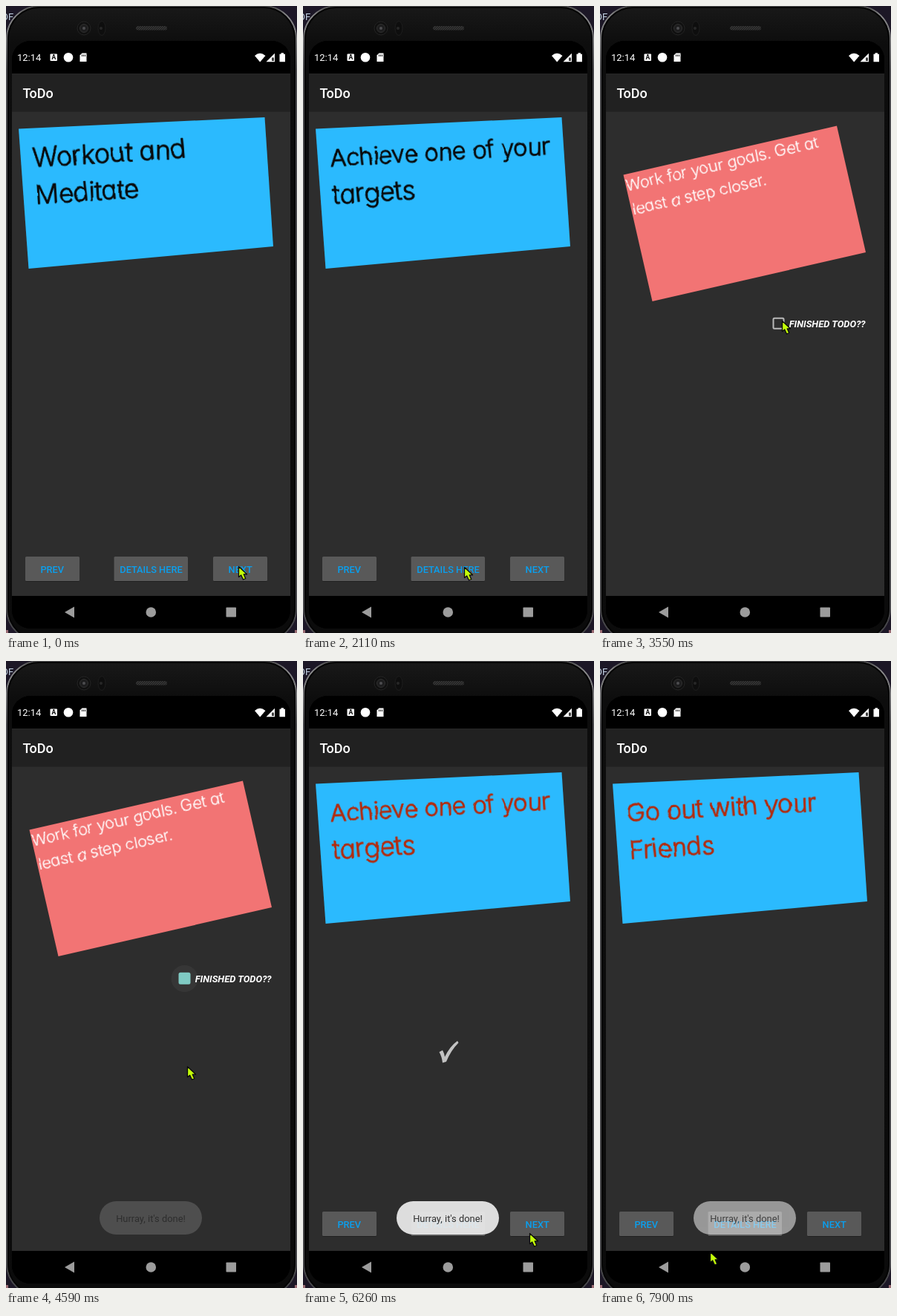
Write an HTML page that moves like this. It is 392 by 845 pixels and loops after 8000 ms.

```html
<!DOCTYPE html>
<html lang="en">
<head>
<meta charset="utf-8">
<title>ToDo</title>
<style>
html, body { margin: 0; width: 100%; height: 100%; overflow: hidden; background: #15111a; }
svg { display: block; width: 100%; height: 100%; }
text { font-family: Roboto, sans-serif; white-space: pre; }
.hand text {
  font-family: Inter, sans-serif; font-weight: 300; font-feature-settings: "cv11";
  stroke-linejoin: round; stroke-linecap: round;
}
.btn text { font-size: 12.8px; font-weight: 500; fill: #0a9fee; text-anchor: middle; }
</style>
</head>
<body>
<svg viewBox="0 0 392 845" preserveAspectRatio="none">
  <defs>
    <clipPath id="screen"><rect x="8" y="47" width="375" height="792" rx="25"/></clipPath>
    <clipPath id="nextClip"><rect x="279" y="742" width="73" height="33" rx="1.5"/></clipPath>
    <clipPath id="detailClip"><rect x="145.5" y="742" width="99.5" height="33" rx="1.5"/></clipPath>
    <linearGradient id="body" x2="0" y2="1">
      <stop offset="0" stop-color="#191919"/><stop offset=".06" stop-color="#0d0d0d"/>
      <stop offset="1" stop-color="#0b0b0b"/>
    </linearGradient>
    <linearGradient id="edge" x2="0" y2="1">
      <stop offset="0" stop-color="#4a4a4b"/><stop offset=".015" stop-color="#8b8b8c"/>
      <stop offset=".1" stop-color="#47474a"/><stop offset="1" stop-color="#47474a"/>
    </linearGradient>
    <pattern id="mesh" width="3" height="3" patternUnits="userSpaceOnUse">
      <rect width="3" height="3" fill="#353535"/><path d="M0 3L3 0" stroke="#191919"/>
    </pattern>
    <filter id="wobble" filterUnits="userSpaceOnUse" x="-10" y="-50" width="360" height="140" color-interpolation-filters="sRGB">
      <feTurbulence type="fractalNoise" baseFrequency=".045" numOctaves="1" seed="4"/>
      <feDisplacementMap in="SourceGraphic" scale="3" xChannelSelector="R" yChannelSelector="G"/>
    </filter>
  </defs>

  <!-- desktop and phone body -->
  <rect width="392" height="845" fill="#1c1726"/>
  <path d="M0 841H3V845H0ZM389 841H392V845H389Z" fill="#9a6c74"/>
  <text x="-6" y="19" font-size="13" fill="#c3d3e4">OF</text>
  <rect x="1" y="0" width="390" height="856" rx="44" fill="url(#body)" stroke="url(#edge)" stroke-width="2"/>
  <rect x="3" y="2" width="386" height="852" rx="42" fill="none" stroke="#050505" stroke-width="2"/>
  <circle cx="105" cy="30" r="9" fill="#101010" stroke="#242424"/>
  <circle cx="105" cy="30" r="5.5" fill="#1d1d1e" stroke="#303030"/>
  <circle cx="105" cy="30" r="2" fill="#4d4d50"/>
  <ellipse cx="129" cy="30" rx="5" ry="9.5" fill="#0e0e0e" stroke="#1e1e1e"/>
  <circle cx="128" cy="30" r="2" fill="#272727"/>
  <rect x="175" y="27" width="42" height="5.5" rx="2.7" fill="url(#mesh)"/>

  <g clip-path="url(#screen)">
    <rect x="8" y="47" width="375" height="792"/>
    <g id="list">
      <rect x="8" y="47" width="375" height="792"/>
      <rect x="8" y="91" width="375" height="704" fill="#2d2d2d"/>
      <rect x="8" y="91.5" width="375" height="51" fill="#212121"/>
      <text x="22.5" y="124" font-size="18" font-weight="500" fill="#fff">ToDo</text>
      <path d="M17 165.5L348.5 150L360 324L30.5 354Z" fill="#2bbafe"/>
      <g id="tasks" class="hand" stroke-width=".8"></g>
      <path id="tick" fill="#c2c2c2" d="M183.5 527L188 524.5Q190.5 529 191 533.5Q198 519 208 512L209.5 514.5Q199 525 193 540L188 541.5Q187 533 183.5 527Z"/>
      <g class="btn">
        <g fill="#1f1f1f"><rect x="26" y="743" width="73" height="33" rx="2"/><rect x="145.5" y="743" width="99.5" height="33" rx="2"/><rect x="279" y="743" width="73" height="33" rx="2"/></g>
        <g fill="#595959"><rect x="26" y="742" width="73" height="33" rx="1.5"/><rect x="145.5" y="742" width="99.5" height="33" rx="1.5"/><rect x="279" y="742" width="73" height="33" rx="1.5"/></g>
        <g clip-path="url(#nextClip)"><circle id="nextWave" cx="313" cy="757" fill="#fff"/></g>
        <g clip-path="url(#detailClip)"><circle id="detailWave" cx="217" cy="757" fill="#fff"/></g>
        <text x="62.3" y="763.5">PREV</text><text x="195.5" y="763.5">DETAILS HERE</text><text x="315.7" y="763.5">NEXT</text>
      </g>
    </g>

    <g id="detail">
      <rect x="8" y="47" width="375" height="792"/>
      <rect x="8" y="91" width="375" height="704" fill="#2d2d2d"/>
      <rect x="8" y="91.5" width="375" height="51" fill="#212121"/>
      <text x="22.5" y="124" font-size="18" font-weight="500" fill="#fff">ToDo</text>
      <path d="M31.5 227.5L319 161.5L358 332L70.5 398Z" fill="#f27474"/>
      <g id="goal" class="hand" fill="#fff" stroke="#fff" stroke-width=".2"></g>
      <circle id="boxWave" cx="240.5" cy="428" r="18" fill="#363636"/>
      <rect id="box" x="233.5" y="420.7" width="14" height="14" rx="1.5" stroke-width="2"/>
      <text x="254.7" y="433" font-size="12.9" font-weight="700" font-style="italic" fill="#fff">FINISHED TODO??</text>
    </g>

    <!-- system icons -->
    <g fill="#fff">
      <text x="15" y="74" font-size="13">12:14</text>
      <rect x="59.5" y="64.5" width="9.5" height="9.5" rx="1"/>
      <text x="64.25" y="72.3" font-size="8.5" font-weight="700" fill="#000" text-anchor="middle">A</text>
      <circle cx="84" cy="69.3" r="6.3"/>
      <path d="M102.5 63.5H108.5V75H99.5V66.5Z"/>
      <path d="M102.5 65.5V68M104.5 65.5V68M106.5 65.5V68" stroke="#000" stroke-width=".9"/>
      <path d="M335 67Q342 60.5 349.5 67L342.2 75.5Z"/>
      <path d="M350.5 75.2L362 63.7V75.2Z"/>
      <path d="M358 69.5H361V74H358Z" fill="#000" opacity=".75"/>
      <path d="M368.5 64.8H370.5V63.3H374V64.8H376V75.2H368.5Z"/>
    </g>
    <g fill="#9c9c9c">
      <path d="M79 817L92 809.5V824.5Z"/>
      <circle cx="195.3" cy="817" r="6.8"/>
      <rect x="296.5" y="810.5" width="13.5" height="13" rx=".8"/>
    </g>
    <g id="toast">
      <rect x="126" y="728" width="138" height="45" rx="22.5" fill="#ebebeb"/>
      <text x="195" y="755.5" font-size="12.9" fill="#2d2d2d" text-anchor="middle">Hurray, it's done!</text>
    </g>
  </g>
  <path id="cursor" d="M.5 .5V14.5L3.7 12L6.5 18L9.7 16.5L7.2 10.8H11.5Z" fill="#c4ff0a" stroke="#0a0a0a" stroke-width="1.3" stroke-linejoin="round"/>
</svg>

<script>
const LOOP = 8000;
const $ = id => document.getElementById(id);
const clamp = v => Math.max(0, Math.min(1, v));
const easeOut = p => 1 - (1 - p) ** 3;
const span = (t, from, len) => clamp((t - from) / len);

const bursts = [
  [280, 980, 6], [1690, 2530, 7], [2800, 3550, 7], [4140, 5130, 8], [5280, 5430, 2],
  [5860, 5980, 2], [6260, 6410, 2], [6810, 7200, 4], [7750, 7900, 2]
];

// Pointer tip: time, x, y.
const path = [
  [0, 313, 755], [1550, 313, 755], [2110, 217, 756], [2675, 217, 757], [2925, 245, 690],
  [3175, 273, 560], [3425, 260, 400], [3550, 245, 424], [4281, 245, 424], [4564, 244, 546],
  [4847, 240, 780], [5130, 264, 792], [5430, 306, 757], [5860, 303, 766], [5980, 302, 776],
  [6260, 305, 771], [6410, 308, 768], [6940, 308, 768], [7070, 290, 828], [7200, 264, 821],
  [7750, 200, 808], [7900, 148, 796]
];

// Each line: x, y, angle, font size, text.
const notes = [
  [[36, 217, -3.4, 36, "Workout and"], [40, 267, -3.6, 35.5, "Meditate"]],
  [[37, 216.5, -3.2, 32.8, "Achieve one of your"], [40, 267, -3.6, 36, "targets"]],
  [[36, 216.5, -3.2, 34.5, "Go out with your"], [40, 267, -3.6, 34.5, "Friends"]]
];
const goal = [
  [36, 250, -13, 22, "Work for your goals. Get at"],
  [45, 281.5, -12.7, 22, "least a step closer."]
];

function add(parent, tag, attrs) {
  const el = document.createElementNS("http://www.w3.org/2000/svg", tag);
  for (const key in attrs) el.setAttribute(key, attrs[key]);
  return parent.appendChild(el);
}

function write(parent, lines) {
  const group = add(parent, "g", {});
  for (const [x, y, angle, size, words] of lines) {
    const line = add(group, "g", { transform: `translate(${x} ${y}) rotate(${angle})`, filter: "url(#wobble)" });
    const tilt = [...words].map((c, i) => (2.5 * Math.sin(i * 2.3)).toFixed(1)).join(" ");
    add(line, "text", { rotate: tilt, "font-size": size, "letter-spacing": -size / 60 }).textContent = words;
  }
  return group;
}

const tasks = notes.map(lines => write($("tasks"), lines));
write($("goal"), goal);

function snap(t) {
  let last = 0;
  for (const [from, to, count] of bursts) {
    if (t < from) break;
    const gap = (to - from) / (count - 1);
    last = Math.min(to, from + Math.floor((t - from) / gap + 1e-6) * gap);
  }
  return last;
}

function pointer(t) {
  const i = path.findIndex(k => k[0] > t);
  if (i < 0) return path[path.length - 1].slice(1);
  const [t0, x0, y0] = path[i - 1], [t1, x1, y1] = path[i];
  const p = (t - t0) / (t1 - t0);
  return [x0 + (x1 - x0) * p, y0 + (y1 - y0) * p];
}

function wave(el, age) {
  const on = age >= 0 && age < 600;
  el.setAttribute("r", on ? 18 + 55 * easeOut(clamp(age / 350)) : 0);
  el.setAttribute("opacity", on ? 0.17 * (1 - clamp((age - 200) / 400)) : 0);
}

const show = (el, on) => el.setAttribute("visibility", on ? "inherit" : "hidden");
const zoom = (el, s) => el.setAttribute("transform", `translate(195.5 443) scale(${s}) translate(-195.5 -443)`);

function draw(time) {
  const t = snap(time);
  const open = easeOut(span(t, 2300, 230));
  const close = easeOut(span(t, 4670, 300));
  const leave = span(t, 4670, 150);
  const done = t >= 4600;

  zoom($("list"), done ? 1.1 - 0.1 * close : t < 2530 ? 1 + 0.055 * open : 1);
  zoom($("detail"), (0.93 + 0.07 * open) * (1 - 0.07 * leave));
  $("detail").setAttribute("opacity", open * (1 - leave));
  show($("detail"), open > 0 && leave < 1);

  const task = t < 420 ? 0 : t < 6900 ? 1 : 2;
  tasks.forEach((el, i) => show(el, i === task));
  const ink = done ? "#b42a0c" : "#080808";
  $("tasks").setAttribute("fill", ink);
  $("tasks").setAttribute("stroke", ink);
  show($("tick"), done && task === 1);

  wave($("nextWave"), t < 6800 ? t - 280 : t - 6810);
  wave($("detailWave"), t - 2200);

  const checked = t >= 4400;
  $("box").setAttribute("fill", checked ? "#80cbc4" : "none");
  $("box").setAttribute("stroke", checked ? "#80cbc4" : "#b9b9b9");
  show($("boxWave"), t >= 4140 && leave < 1);

  $("toast").setAttribute("opacity", 0.93 * span(t, 4520, 240) - 0.0016 * Math.max(0, t - 7670));
  const [x, y] = pointer(t);
  $("cursor").setAttribute("transform", `translate(${x} ${y})`);
}

const start = performance.now();
function tick() {
  draw((performance.now() - start) % LOOP);
  requestAnimationFrame(tick);
}
draw(0);
tick();
</script>
</body>
</html>
```
